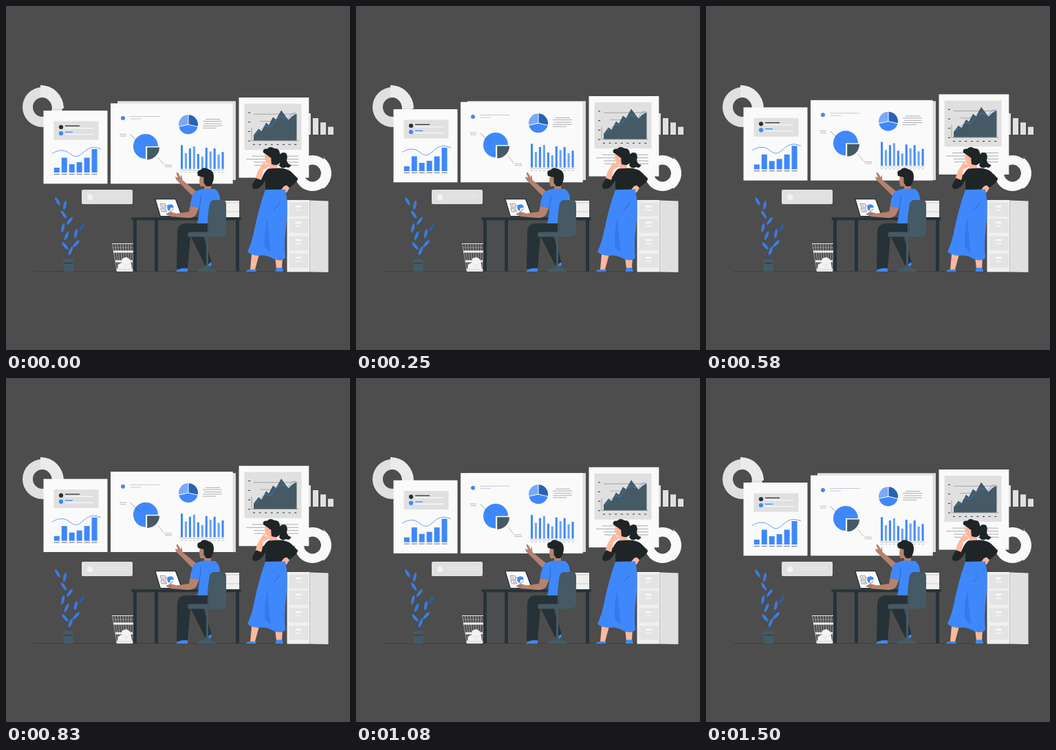
Animation, 500 px wide and 500 px high, one loop 1540 ms. Source, as an HTML page with a canvas:

```html
<!DOCTYPE html>
<html lang="en">
<head>
<meta charset="utf-8">
<title>Team reviewing charts</title>
<style>
html, body { margin: 0; width: 100%; height: 100%; overflow: hidden; background: #4d4d4d; }
canvas { display: block; width: 500px; height: 500px; }
</style>
</head>
<body>
<canvas id="stage" width="500" height="500"></canvas>
<script>
const ctx = document.getElementById('stage').getContext('2d');
const LOOP = 1540, STEP = 125 / 3, FLOAT = 1500, RISE = 6, TURN = Math.PI * 2;
const BLUE = '#3f88fb', DEEP = '#2862b5', PALE = '#78aaf9', INK = '#263238', SLATE = '#455a64',
      PAPER = '#fafafa', GREY = '#e0e0e0', SKIN = '#b5826f', PEACH = '#ffb89c', BLACK = '#1f2527';

function rect(x, y, right, bottom, color) {
  ctx.fillStyle = color;
  ctx.fillRect(x, y, right - x, bottom - y);
}
function round(x, y, right, bottom, radius, color) {
  ctx.fillStyle = color;
  ctx.beginPath();
  ctx.roundRect(x, y, right - x, bottom - y, radius);
  ctx.fill();
}
function shape(d, color) {
  ctx.fillStyle = color;
  ctx.fill(new Path2D(d));
}
function stroke(d, color, width = 0.7) {
  ctx.strokeStyle = color;
  ctx.lineWidth = width;
  ctx.stroke(new Path2D(d));
}
function hline(x, right, y, color, width) {
  stroke(`M${x} ${y}H${right}`, color, width);
}
function oval(x, y, rx, ry, color, tilt = 0) {
  ctx.fillStyle = color;
  ctx.beginPath();
  ctx.ellipse(x, y, rx, ry, tilt, 0, TURN);
  ctx.fill();
}
function dot(x, y, r, color) { oval(x, y, r, r, color); }

// Angles are in degrees, clockwise from the right.
function sector(x, y, r, from, to, color, inner = 0) {
  const a = from * Math.PI / 180, b = to * Math.PI / 180;
  ctx.fillStyle = color;
  ctx.beginPath();
  ctx.arc(x, y, r, a, b);
  if (inner) ctx.arc(x, y, inner, b, a, true);
  else ctx.lineTo(x, y);
  ctx.fill();
}

function wall() {
  rect(0, 0, 500, 500, '#4d4d4d');
  hline(40, 460, 385.7, '#393939', 0.7);
  sector(53, 147, 29, 0, 360, GREY, 14);
  sector(50, 149, 34, -90, 0, '#ebebeb', 17);
  sector(445.5, 243, 26, 0, 360, PAPER, 12.5);
  sector(445.5, 243, 27.5, -52, 55, PAPER, 12.5);
  stroke('M453 232L463 219M453 253L462 264', '#dedede', 0.5);
  rect(436, 156, 443, 187, GREY);
  for (let i = 0; i < 3; i++) rect(446 + i * 11, 163 + i * 6.3, 454 + i * 11, 187, GREY);
  round(110, 267, 184, 288, 2, GREY);
  dot(122.3, 278, 4.4, '#f2f2f2');
  hline(132, 176, 275.5, '#f0f0f0');
  hline(132, 176, 278.7, '#f0f0f0');
  rect(162, 138.5, 334, 253, '#dcdcdc');
  hline(162, 334, 139, '#f1f1f1', 0.8);
}

function trendPoster() {
  rect(54.5, 152, 147.5, 258.3, PAPER);
  rect(69.5, 167.5, 134.5, 194.5, GREY);
  [[176, INK, 107], [185, BLUE, 97]].forEach(([y, color, right]) => {
    dot(80, y, 3.1, color);
    hline(86, right, y - 1.7, color, 1.3);
    hline(86, 127, y + 1.6, '#f7f7f7', 1.3);
  });
  stroke('M67 214.5C77 208 86 209 92 214C101 221 104 220 112 213C120 206 126 203 138 208', BLUE, 0.8);
  [235, 220.5, 230, 227, 220.5, 208].forEach((top, i) => {
    const x = 69.8 + i * 10.95;
    rect(x, top, x + 8, 242, BLUE);
    hline(x, x + 8, 244.4, '#4a4a4a', 0.8);
  });
}

function mainPoster() {
  rect(152, 141.5, 329.7, 258.3, PAPER);
  dot(170, 163, 3, BLUE);
  hline(180, 223, 160.5, '#9aaac2', 0.6);
  hline(181, 196, 164, '#9aaac2', 0.6);
  hline(165, 175, 186.3, '#8d8d8d', 0.6);
  hline(166, 175, 189, '#8d8d8d', 0.6);
  dot(203, 204, 18, BLUE);
  shape('M203 204H224V224H203Z', PAPER);
  sector(205.2, 205.5, 17.8, 0, 90, SLATE);
  stroke('M180.5 186.5L189 195L196 200', '#4f6482', 0.6);
  stroke('M221 220L229 230', '#8d8d8d', 0.6);
  hline(230, 241, 231.2, '#8d8d8d', 0.6);
  hline(231, 241, 233.7, '#8d8d8d', 0.6);

  sector(265, 172.3, 14, 12, 168, BLUE);
  sector(265, 172.3, 14, 168, 270, PALE);
  sector(265, 172.3, 14, -90, 12, DEEP);
  stroke('M265 158V172.3L279 175.4M265 172.3L251 175.4', PAPER, 1);
  [[290, 311, 164.6], [286, 314, 167.5], [288, 313, 171], [286, 314, 174.2], [286, 306, 177.3]]
    .forEach(([x, right, y]) => hline(x, right, y, '#777', 0.6));

  [202.3, 214, 207, 204, 215, 219, 206, 211.5, 207, 216, 212.3].forEach((top, i) => {
    const x = 254 + i * 5.95;
    rect(x, top, x + 3.1, 236.8, i % 2 ? '#6ea2f6' : BLUE);
    hline(x, x + 3.2, 241.4, '#999', 0.6);
  });
  hline(253, 318, 238.5, '#aaa', 0.6);
}

function areaPoster() {
  rect(338.5, 133, 440.3, 249.6, PAPER);
  rect(346.5, 142, 429.5, 209, GREY);
  for (let i = 0; i < 4; i++) hline(352, 355, 155 + i * 13.7, INK, 1);
  hline(360, 421, 157.2, '#777', 0.6);
  hline(369, 421, 167.5, '#888', 0.6);
  stroke('M357 178V195.8H425', '#777', 0.6);
  shape('M360 195.5V187.5L367 178.5L371.5 182L378 169.5L382 173L388 161.5L392.5 165L400 151.5L410.5 165.5L416 160L422.5 156.5V195.5Z', SLATE);
  stroke('M360 188L368 182L377 174L384 176L393 165L400 160L410 164L416 156L422 155.5', BLUE, 0.6);
  for (let i = 0; i < 8; i++) hline(359 + i * 8.6, 362 + i * 8.6, 201.3, INK, 1);
  [[358, 425, 218.2], [349, 425, 222.7], [360, 425, 227], [361, 425, 231.4]]
    .forEach(([x, right, y]) => hline(x, right, y, '#888', 0.7));
}

function plant() {
  stroke('M91 368Q89 345 83 340M91 366Q92 335 87 317Q82 300 74 282M88 320Q95 312 93 309M92 362Q98 338 112 320M83 298L86 286', '#31547f', 0.6);
  [[75, 284, -0.52], [85.5, 289.5, 0.22], [84, 303, -0.6], [92.5, 312.3, 0.65],
   [82.7, 322.5, 0.22], [88, 334, 0.42], [101.5, 330.7, 0.2], [110, 322, 0.6],
   [86, 348.7, -0.7], [94, 356, 0.4], [102, 345.5, 0.75]].forEach(([x, y, tilt], i) => {
    oval(x, y, 1.9, 6.8, i === 7 ? DEEP : BLUE, tilt);
    const dx = Math.sin(tilt) * 6, dy = Math.cos(tilt) * 6;
    stroke(`M${x + dx} ${y - dy}L${x - dx} ${y + dy}`, '#244e8c', 0.5);
  });
  shape('M83 368H98.5L97.5 386H84Z', SLATE);
  hline(85, 97, 373.8, INK, 1);
}

function bin() {
  for (let i = 0; i <= 8; i++) stroke(`M${154.5 + i * 3.9} 345L${161 + i * 2.8} 384`, '#d8d8d8', 0.6);
  hline(154, 186, 345.5, '#e8e8e8', 1);
  hline(155, 185, 351, '#bbb', 0.5);
  rect(156, 355.5, 185, 358.5, '#eee');
  rect(159, 369.5, 184, 372.5, '#eee');
  shape('M162 383L163 376L168 373L169 367L175 365L180 368L182 375L183 383Z', '#f3f3f3');
  stroke('M168 373L174 377L180 374M174 377L173 383', '#d3d3d3', 0.6);
  round(160.5, 381.5, 184.5, 386, 1.5, '#e6e6e6');
}

function cabinet() {
  rect(408.5, 282, 441.5, 386.5, '#f0f0f0');
  shape('M441.5 282.5L468.5 283.5V387L441.5 386.5Z', GREY);
  [285.5, 309, 334.5, 360].forEach(y => {
    rect(411.5, y, 440, y + 20.5, '#e4e4e4');
    rect(421, y + 4.5, 429.5, y + 7, PAPER);
    rect(421, y + 10.3, 429.5, y + 11.8, '#f5f5f5');
  });
}

function desk() {
  rect(317, 283, 339, 307, '#f0f0f0');
  hline(317, 339, 286, '#bdbdbd', 0.7);
  hline(317, 339, 299, '#bdbdbd', 0.7);
  [185, 216, 334].forEach(x => rect(x, 309, x + 5, 385.5, INK));
  rect(182.5, 307.3, 341.5, 311.3, INK);
  shape('M216 280H247L257 306.5H224Z', INK);
  shape('M217.8 281.2H246L254.8 305H224.8Z', PAPER);
  stroke('M224 287.5H231L232.5 292.5H225.5ZM225 294.5H232L233.5 299H226.5ZM226 290H230M228 297H232M232 290H236', '#555', 0.6);
  dot(239, 293, 4.8, BLUE);
  shape('M239 293.5L244.5 293L243 299L238 298.5Z', PAPER);
  stroke('M237 300.5L241 297L243.5 295', INK, 0.6);
}

function seatedMan() {
  shape('M268 334H287L299 373L290.5 379Z', INK);
  shape('M290 379L298 372L299 376L293 381Z', BLUE);
  shape('M249 330Q249 316 262 316H304V334H268L264 382H248Z', INK);
  shape('M247 386Q249 383 256 381.3H264V386Z', BLUE);
  shape('M274 279L252 257L247 252L246 248L250 249.5L247.5 243Q248.5 240 251 244L254 249L255.5 245L256.5 253L276 269Z', SKIN);
  shape('M282 246L281 255L282.5 262H288V269H298V248Z', SKIN);
  shape('M279 247Q276 239 282.5 238.5Q287 233 294 237Q302 239 302 248Q302 256 297 262H291L287.5 257V249Z', BLACK);
  shape('M273 271Q281 265.5 291 265.5L304 266Q311 271 311 282V316H278L281 293L267.5 291Q269 279 273 271Z', BLUE);
  stroke('M283 275Q283 286 281 293L279 314', '#2459a8', 0.7);
  shape('M267.7 291L266 299L248 301.5L239 299L232 302.5L240 306L264 308Q274 308 277 302L280.5 293Z', SKIN);
  hline(233, 241, 302.6, '#815648', 0.6);
  shape('M293 316Q293 304 295 293Q296 282 302 282H315Q320 282 320 289V328Q320 335.5 312 335.5H264.5V330Q265 328.5 270 328.5H293Z', SLATE);
  stroke('M295 317V327Q295 329 292 329', '#354850', 0.7);
  rect(291, 335, 294, 379, SLATE);
  shape('M277 386Q282 380 289 379.5L291 376H294L296 379.5Q303 381 307 386Z', SLATE);
}

function standingWoman() {
  shape('M357 361L355 383H362L368 361Z', PEACH);
  shape('M391 364L393 382H401L402 364Z', PEACH);
  shape('M348.5 386Q351 383 355 383H363.5V386Z', BLUE);
  shape('M391.5 386L393 380.5H401.5L403 386Z', BLUE);
  shape('M377 215L376 222L379 229L383 231L382 239H394V215Z', PEACH);
  shape('M361 255L366 240L373 229L375.5 227L378 230L384 231L380 235L374 238L371 256Z', PEACH);
  shape('M374 213Q372 207 380 207.5Q384 203 390 207Q397 206 398 214V228Q394 233 386 230L385 221L380 217Z', BLACK);
  shape('M396 218Q401 211 407 214Q410 218 408 224Q409 230 414.5 231Q412 237 407 234Q402 238 397 232Q399 227 397 224Z', BLACK);
  dot(383.5, 222, 2, PEACH);
  shape('M381 236.5L397 235.5Q409 236 414.5 241L424 250.5Q425 255 411 264.5L406 261V268H377L377 253Q370 266 363 266Q357 266 358 260L363 250L371 253Q375 241 381 236.5Z', BLACK);
  shape('M404 262L408 260.5L412 264.5L408 271L401 272L400 267Z', PEACH);
  shape('M377 267L406 266.5Q411 290 407 320Q404 346 406 366Q401 372 390 368Q378 361 366 363Q355 362 351 357Q357 345 361 325Q368 291 377 267Z', BLUE);
  shape('M380 307Q375 329 376 348Q378 355 385 357Q382 340 380 307Z', '#347ae8');
  stroke('M389 297L396 289L397 286', '#255caf', 0.7);
}

function draw(time) {
  const step = Math.floor((time % LOOP + 5) / STEP) % 37;
  const lift = RISE * (1 - Math.abs(2 * step * STEP / FLOAT - 1));
  wall();
  ctx.save();
  ctx.translate(0, -lift);
  trendPoster();
  mainPoster();
  areaPoster();
  ctx.restore();
  plant();
  bin();
  cabinet();
  desk();
  seatedMan();
  standingWoman();
}

const start = performance.now();
function tick() {
  draw(performance.now() - start);
  requestAnimationFrame(tick);
}
tick();
</script>
</body>
</html>
```
